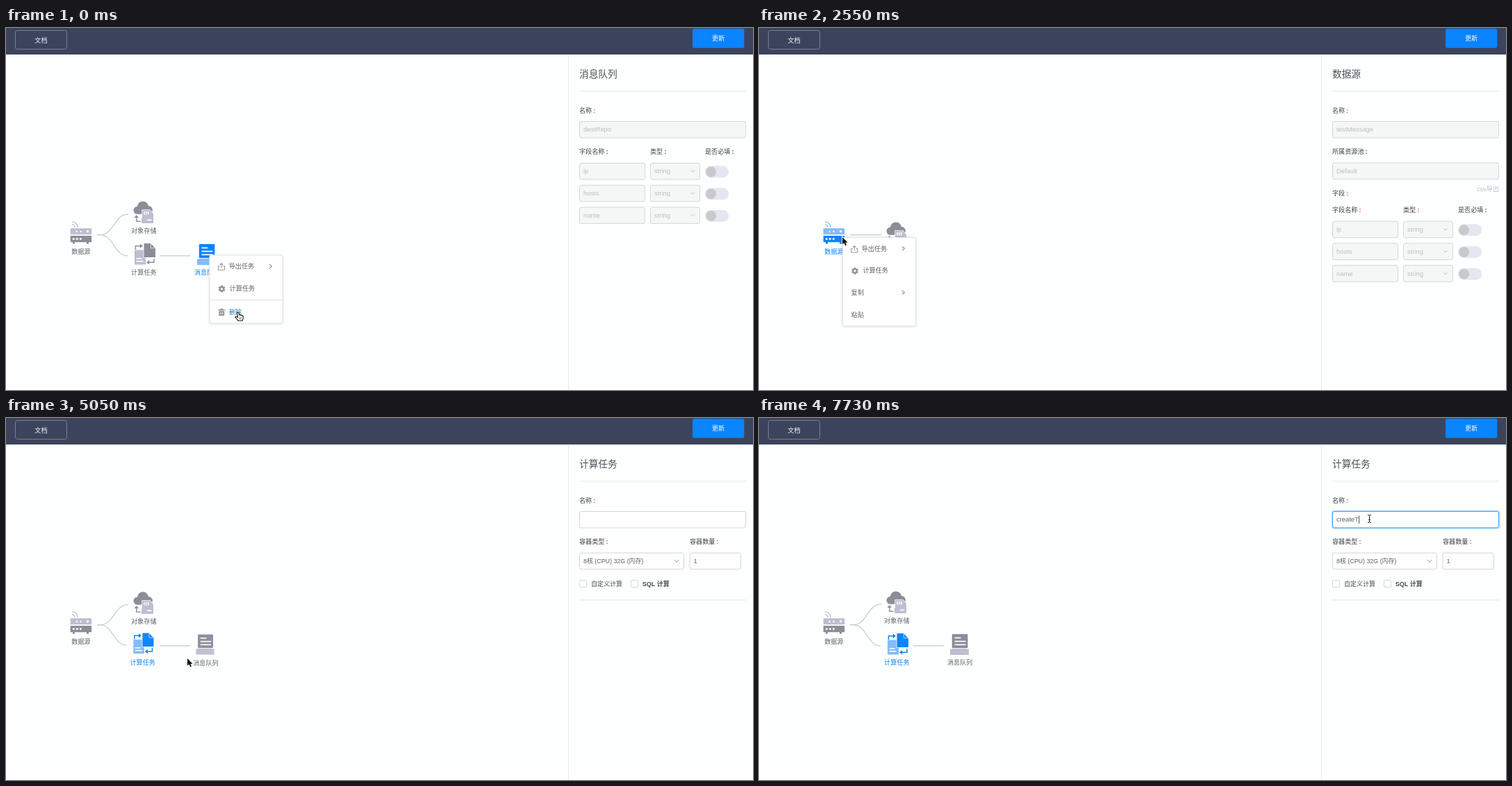
Animation of 1075x521 px, one loop 8000 ms. Source, as an HTML page with a canvas:

```html
<!DOCTYPE html>
<html lang="zh-CN">
<head>
<meta charset="utf-8">
<title>任务编排</title>
<style>
html, body { margin: 0; width: 100%; height: 100%; overflow: hidden; background: #fdfefe; }
canvas { display: block; }
</style>
</head>
<body>
<canvas id="stage" width="1075" height="521"></canvas>
<script>
const ctx = document.getElementById('stage').getContext('2d');
const LOOP = 8000;
const FONT = '"Liberation Sans","Noto Sans CJK SC","Noto Sans CJK",sans-serif';
const BLUE = '#0a84ff', INK = '#5f626a';
const GREY_SET = ['#8b8e99', '#bcbfd0'], BLUE_SET = ['#0a84ff', '#82bcfb'];

// ---------- helpers ----------
function text(s, x, y, color = INK, size = 9.1, weight = 400, align = 'left') {
  ctx.font = `${weight} ${size}px ${FONT}`;
  ctx.textAlign = align;
  ctx.fillStyle = color;
  ctx.fillText(s, x, y + size * 0.37);
  return ctx.measureText(s).width;
}
function rect(x, y, w, h, color) {
  ctx.fillStyle = color;
  ctx.fillRect(x, y, w, h);
}
function box(x, y, w, h, r, fill, stroke, lw = 1) {
  ctx.beginPath();
  ctx.roundRect(x, y, w, h, r);
  if (fill) { ctx.fillStyle = fill; ctx.fill(); }
  if (stroke) { ctx.strokeStyle = stroke; ctx.lineWidth = lw; ctx.stroke(); }
}
function dot(x, y, r, color) {
  ctx.beginPath();
  ctx.arc(x, y, r, 0, 7);
  ctx.fillStyle = color;
  ctx.fill();
}
function fill(d, color) {
  ctx.fillStyle = color;
  ctx.fill(new Path2D(d));
}
function line(d, color, lw = 1) {
  ctx.strokeStyle = color;
  ctx.lineWidth = lw;
  ctx.stroke(new Path2D(d));
}
function at(x, y, draw, scale = 1) {
  ctx.save();
  ctx.translate(x, y);
  ctx.scale(scale, scale);
  draw();
  ctx.restore();
}
// Linear interpolation over [k, value...] rows
function track(rows, k) {
  let i = 0;
  while (i < rows.length - 1 && rows[i + 1][0] <= k) i++;
  const a = rows[i], b = rows[Math.min(i + 1, rows.length - 1)];
  const f = b === a ? 0 : Math.max(0, (k - a[0]) / (b[0] - a[0]));
  return a.slice(1).map((v, j) => v + (b[j + 1] - v) * f);
}

// ---------- node icons, drawn from their top left ----------
function sourceIcon([dark, light]) {
  line('M3 4.8A4.2 4.2 0 0 1 7.2 9M3 .8A8 8 0 0 1 11 9', light, 1.3);
  box(.6, 10.2, 30.6, 9, 1, light);
  box(.6, 21, 30.6, 9.2, 1, dark);
  rect(4, 30, 3, 2.6, dark);
  rect(24, 30, 3, 2.6, dark);
  [8.5, 14.5].forEach(x => rect(x, 13.8, 2.2, 2.2, '#fff'));
  dot(25.5, 14.8, 1.8, '#fff');
  [5.3, 10.3, 15.3].forEach(x => dot(x, 25.6, 1.5, '#fff'));
}
function storageIcon([dark, light]) {
  dot(14, 8.6, 8.2, dark);
  dot(6, 13.3, 5.5, dark);
  dot(22, 13, 5.9, dark);
  rect(6, 10, 16, 8.8, dark);
  const card = 'M13 13H24L29 18V32H12V25L13 24Z';
  line(card, '#fdfefe', 1.4);
  fill(card, light);
  [15.3, 18.2, 21.1].forEach(x => rect(x, 15, 1.5, 4.6, '#fff'));
  rect(20, 26.5, 6.5, 1.7, '#fff');
  line('M10.5 29.2H4.8V22', dark, 1.4);
  fill('M4.8 20L1.6 24H8Z', dark);
}
function taskIcon([dark, light]) {
  fill('M1 9.5H17V30.5H1Z', light);
  rect(3.5, 21, 8, 1.6, '#fff');
  rect(3.5, 25, 10, 1.6, '#fff');
  const page = 'M14.5 0H24L31 7V20H14.5Z';
  line(page, '#fdfefe', 1.5);
  fill(page, dark);
  line('M24.3 0V6.7H31', '#fdfefe', .7);
  line('M2.5 9V3.8H9.5', dark, 1.5);
  fill('M13 3.8L8.8 .5V7.1Z', dark);
  line('M29 22V27.2H22', dark, 1.5);
  fill('M18 27.2L22.2 23.9V30.5Z', dark);
}
function queueIcon([dark, light]) {
  fill('M3 20H24V21.5H27V30H0V21.5H3Z', light);
  box(2.8, 0, 22.6, 20, 1, dark);
  rect(0, 20, 27, .9, '#fdfefe');
  rect(6.5, 4.6, 9, 1.7, '#fff');
  rect(6.5, 9.6, 16, 1.7, '#fff');
  rect(6.5, 14.4, 16, 1.7, '#fff');
}

// ---------- tree; p = 0 open, 1 collapsed ----------
function node(icon, ix, iy, name, lx, ly, on, scale = 1) {
  at(ix, iy, () => icon(on ? BLUE_SET : GREY_SET), scale);
  text(name, lx, ly, on ? BLUE : INK, 9.1, 400, 'center');
}
// Short straight stub, then an S curve
function link(x1, y1, x2, y2) {
  const s = x1 + (x2 - x1) * .1, m = (s + x2) / 2;
  line(`M${x1} ${y1}H${s}C${m} ${y1} ${m} ${y2} ${x2} ${y2}`, '#c8c9cb', 1.2);
}
function tree(p, on) {
  link(131, 297.6, 176, 267.8 + 29.8 * p);
  if (p < 1) {
    link(131, 297.6, 175 - 44 * p, 327.8 - 30 * p);
    link(221.5, 327.8, 266 - 44 * p, 327.8);
  }
  node(sourceIcon, 92, 278, '数据源', 107.8, 322, on === 'source');
  node(storageIcon, 183, 249 + 30 * p, '对象存储', 198.3, 291.8 + 30 * p, false);
  if (p >= 1) return;
  ctx.globalAlpha = 1 - p * .85;
  node(taskIcon, 184 - 54 * p, 310 - 13 * p, '计算任务', 198.3 - 53 * p, 352 - 14 * p, on === 'task', 1 - p);
  node(queueIcon, 275 - 53 * p, 311 + 17 * p, '消息队列', 289 - 53 * p, 352 + 15 * p, on === 'queue', 1 - p);
  ctx.globalAlpha = 1;
}

// ---------- side panel ----------
const heading = s => text(s, 825, 65.5, '#4c4f57', 13.65, 500);
function label(s, x, y, red) {
  const w = text(s, x, y, '#3f4249', 9.1, 500);
  text(':', x + w + 2, y, red ? '#f0413c' : '#3f4249', 9.1, 700);
}
function field(x, y, w, value, off, chevron, size = 9.35) {
  box(x + .5, y - 11.5, w - 1, 23.5, 2.5, off ? '#f5f6f6' : '#fefefe', '#d4d6da');
  text(value, x + 6, y, off ? '#bdbec2' : '#5d5f66', size);
  if (chevron) line(`M${x + w - 14} ${y - 1.5}l3 3l3 -3`, off ? '#bdbec2' : '#8b8e96', 1);
}
function schemaRows(y, red) {
  label('字段名称', 825, y, red);
  label('类型', 927, y, red);
  label('是否必填', 1006, y);
  ['ip', 'hosts', 'name'].forEach((name, i) => {
    const ry = y + 28 + i * 31.7;
    field(825, ry, 95, name, true);
    field(927, ry, 72, 'string', true, true);
    box(1006, ry - 7.5, 34, 17, 8.5, '#e4e7f0');
    dot(1014.6, ry + 1, 7.4, '#c9c9cb');
  });
}
const panels = {
  queue() {
    heading('消息队列');
    field(825, 146, 240, 'destRepo', true);
    schemaRows(178);
  },
  source() {
    heading('数据源');
    field(825, 146, 240, 'testMessage', true);
    label('所属资源池', 825, 178);
    field(825, 205.7, 240, 'Default', true);
    label('字段', 825, 237.5, true);
    text('csv导出', 1065, 232, '#b9bcc8', 9.1, 400, 'right');
    schemaRows(261.7, true);
  },
  task(k) {
    heading('计算任务');
    const typed = 'createT'.slice(0, k >= 44 ? 7 : Math.max(0, Math.min(6, k - 34)));
    field(825, 146, 240, typed);
    if (k >= 32) {
      ctx.globalAlpha = k === 32 ? .55 : 1;
      box(824.4, 133.4, 241.4, 25.7, 3.2, null, 'rgba(24,144,255,.3)', 1.3);
      box(825.5, 134.5, 239, 23.5, 2.5, null, '#3ba4f5');
      ctx.globalAlpha = 1;
      if (k !== 43) {
        ctx.font = `9.35px ${FONT}`;
        rect(Math.round(831 + ctx.measureText(typed).width), 140.5, 1, 11.5, '#55575d');
      }
    }
    label('容器类型', 825, 178, true);
    label('容器数量', 984, 178, true);
    field(825, 205.7, 151, '8核 (CPU) 32G (内存)', false, true, 8.9);
    field(983.5, 205.7, 74.5, '1');
    [[825, '自定义计算', 842, 500], [899, 'SQL 计算', 915.8, 600]].forEach(([x, s, tx, weight]) => {
      box(x + .5, 233.5, 10, 10, 1.5, '#fff', '#d4d6da');
      text(s, tx, 238.3, '#46494f', 9, weight);
    });
    rect(825, 261.5, 240, 1, '#e6e8ea');
  }
};

// ---------- menus ----------
function sheet(x, y, w, h, blur) {
  ctx.save();
  ctx.shadowColor = 'rgba(60,70,90,.22)';
  ctx.shadowBlur = blur;
  ctx.shadowOffsetY = blur / 5;
  box(x, y, w, h, 3, '#fff');
  ctx.restore();
  box(x + .5, y + .5, w - 1, h - 1, 3, null, '#dfe2e7');
}
function exportIcon(x, y) {
  line(`M${x - 2.5} ${y - .5}H${x - 4.5}V${y + 5}H${x + 4.5}V${y - .5}H${x + 2.5}`, '#96989e', 1.1);
  line(`M${x} ${y + 2.5}V${y - 4.5}M${x - 2.4} ${y - 2}L${x} ${y - 4.6}L${x + 2.4} ${y - 2}`, '#96989e', 1.1);
}
function gearIcon(x, y) {
  at(x, y, () => {
    for (let i = 0; i < 6; i++) {
      ctx.rotate(Math.PI / 3);
      rect(-1.4, -5, 2.8, 3, '#96989e');
    }
    dot(0, 0, 3.9, '#96989e');
    dot(0, 0, 1.5, '#fff');
  });
}
function trashIcon(x, y) {
  rect(x - 5, y - 4, 10, 1.5, '#96989e');
  rect(x - 2, y - 5.2, 4, 1.2, '#96989e');
  box(x - 4, y - 1.8, 8, 7, 1, '#96989e');
  rect(x - 1.8, y + .3, 1, 3, '#fff');
  rect(x + .8, y + .3, 1, 3, '#fff');
}
const chevron = (x, y, c) => line(`M${x - 1.8} ${y - 2.8}L${x + 1.8} ${y}L${x - 1.8} ${y + 2.8}`, c, 1);

function queueMenu(delColor) {
  sheet(292.5, 326.5, 106, 99, 3);
  exportIcon(310, 343.2);
  text('导出任务', 320.7, 343);
  chevron(380.8, 343, INK);
  gearIcon(310.6, 375.4);
  text('计算任务', 321.7, 374.8);
  rect(293, 391, 105, 1, '#dfe2e7');
  trashIcon(310.3, 409);
  text('删除', 321, 408.5, delColor);
}
function sourceMenu(exportColor, taskColor) {
  sheet(120, 301, 106, 128.5, 3);
  exportIcon(137.3, 318);
  text('导出任务', 147.7, 317.3, exportColor);
  chevron(207.8, 317.3, exportColor);
  gearIcon(138, 349.6);
  text('计算任务', 149.5, 349, taskColor);
  text('复制', 132.8, 380.6);
  chevron(207.8, 380.6, INK);
  text('粘贴', 132.8, 412.3);
}
function subMenu() {
  sheet(227.5, 301, 121.5, 127.5, 5);
  const c = '#96989e';
  box(242, 313.5, 8, 5.5, .8, null, c, 1.1);
  fill('M239.5 316H241V320.5H247V322H239.5Z', c);
  rect(243, 320.5, 5, 1.2, c);
  text('导出至 HTTP', 256.2, 317.3);
  fill('M239.5 345H242V349H247V345H249.5V352H239.5Z', c);
  rect(243, 346, 3, 1.3, c);
  rect(241.5, 353, 6, 1.2, c);
  text('导出至日志检索服务', 255, 349, INK, 9);
  dot(243, 379.8, 3.6, c);
  line('M243 377.5V380H245', '#fff', .9);
  box(245, 381, 5.2, 5, .6, c);
  rect(246.2, 383.2, 2.8, .9, '#fff');
  text('导出至时序数据库', 256.2, 380.6, INK, 9);
  rect(242.5, 407.5, 5.5, 4, c);
  rect(239.8, 409.5, 2, 2, c);
  box(239.8, 412, 9.5, 5, .6, c);
  rect(241.5, 414, 4, 1, '#fff');
  text('导出至对象存储', 255, 412.2, INK, 9);
}

// ---------- pointer ----------
const pointers = {
  arrow() {
    const d = 'M0 0V10.6L2.5 8.4L4.2 12.2L6 11.4L4.4 7.7H7.6Z';
    line(d, '#fff', 1.8);
    fill(d, '#111');
  },
  hand() {
    const d = 'M-1.6 .8Q-.3 -.8 .9 .9L1.8 4Q3 3.2 3.8 4.4Q5 3.8 5.6 5Q7 4.6 7.3 6.2Q7.6 9 6.2 12.2H-.2Q-1.2 9.8 -4 7.4Q-3.8 5.8 -2 6.6L-.4 7.2Z';
    fill(d, '#fff');
    line(d, '#111', 1.1);
    line('M2.1 7.6V10.3M4 7.6V10.3', '#111', .7);
  },
  beam() {
    const d = 'M-2.5 -5.5Q0 -5.5 0 -4V4Q0 5.5 -2.5 5.5M2.5 -5.5Q0 -5.5 0 -4M0 4Q0 5.5 2.5 5.5M-1.3 1.5H1.3';
    line(d, '#fff', 2.2);
    line(d, '#222', 1);
  }
};
const PATH = [[0, 334, 409], [1, 333, 392], [2, 332, 374], [3, 305, 360], [4, 245, 336], [5, 175, 312],
  [6, 130, 302], [7, 120, 301], [9, 120, 301], [11, 142, 313], [13, 174, 334], [14, 178, 341], [16, 178, 341],
  [17, 178, 345], [22, 178, 345], [24, 195, 346], [26, 261, 346], [27, 390, 300], [29, 770, 170], [31, 878.5, 145]];
const FOLD = [[0, 0], [1, .1], [2, .41], [3, .8], [4, .97], [5, 1], [23, 1], [24, .75], [25, .25], [26, .03], [27, 0]];

function pointerKind(k) {
  if (k < 1 || (k >= 11 && k < 22)) return 'hand';
  return k < 31 ? 'arrow' : 'beam';
}

// ---------- scene ----------
function draw(t) {
  // The screen refreshes in steps of about 148 ms
  const k = Math.max(-1, Math.floor((t - 1194) / 148));
  const view = k < 0 ? 'queue' : k < 22 ? 'source' : 'task';
  const active = view === 'task' && k < 24 ? 'source' : view;

  rect(0, 0, 1075, 521, '#fdfefe');
  rect(0, 0, 1075, 38, '#3c445d');
  rect(0, 37, 1075, 1, '#353d54');
  rect(0, 38, 1075, 1, '#e3e5ea');
  box(13.5, 3.5, 74, 27, 3, null, '#7a8091');
  text('文档', 50.5, 17.3, '#f4f5f7', 9.2, 400, 'center');
  box(988, 1, 74.3, 27.8, 2.5, BLUE);
  text('更新', 1025, 15, '#fff', 9.1, 400, 'center');

  rect(809, 38, 1, 483, '#e8eaec');
  rect(825, 90.5, 240, 1, '#e6e8ea');
  label('名称', 825, 118.3, true);
  panels[view](k);
  tree(track(FOLD, k)[0], active);

  if (k < 0) queueMenu(t < 150 ? '#2f7fbe' : t < 330 ? '#1c82dc' : BLUE);
  if (k >= 9 && k < 22) {
    sourceMenu(k >= 11 ? '#1289e6' : INK, k < 13 ? INK : k < 17 ? '#1c86d6' : '#47698c');
    if (k >= 15) subMenu();
  }
  const [x, y] = track(PATH, k);
  at(x, y, pointers[pointerKind(k)]);
}

const start = performance.now();
function tick() {
  draw((performance.now() - start) % LOOP);
  requestAnimationFrame(tick);
}
tick();
</script>
</body>
</html>
```
